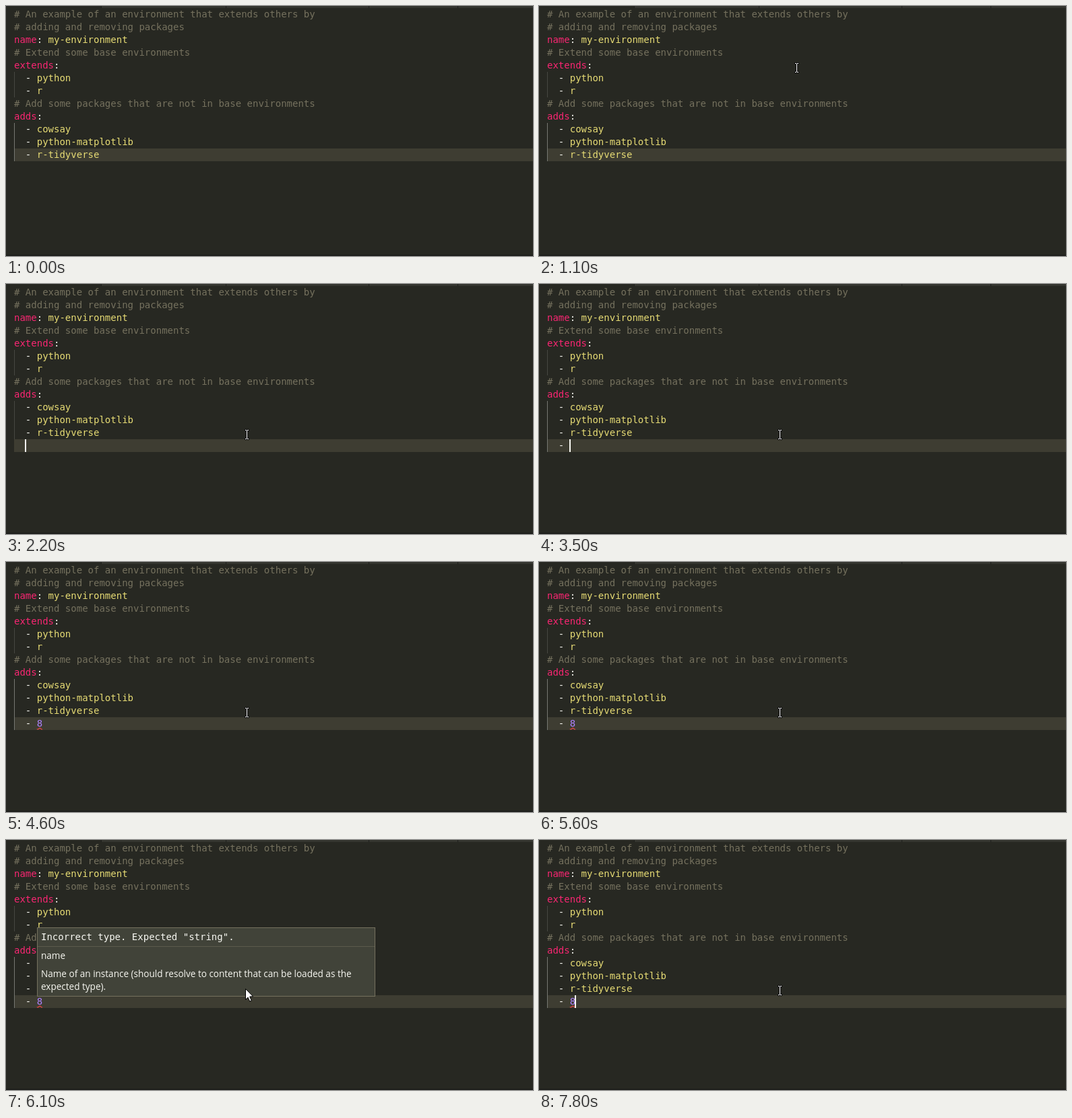
Animation of 782 by 372 pixels, one loop 8000 ms. Source, as an HTML page with a canvas:

```html
<!DOCTYPE html>
<html lang="en">
<head>
<meta charset="utf-8">
<title>Editing a YAML file</title>
<style>
  html, body { margin: 0; width: 100%; height: 100%; overflow: hidden; background: #272822; }
  canvas { display: block; }
</style>
</head>
<body>
<canvas id="stage" width="782" height="372"></canvas>
<script>
const W = 782, H = 372;
const LOOP = 8000, STEP = 100, BLINK = 500;
const LEFT = 12, TOP = 3, ROW = 19, CHAR = 8.428;
const MONO = '14px "DejaVu Sans Mono", monospace';
const SANS = '13.55px "Open Sans", sans-serif';
const C = {
  bg: '#272822', row: '#3e3d32', tab: '#34352f', edge: '#1e1f1c',
  text: '#f8f8f2', comment: '#75715e', key: '#f92672', string: '#e6db74',
  number: '#ae81ff', guide: '#464741', activeGuide: '#767771', error: '#ea4646',
  popup: '#414339', popupEdge: '#75715e', popupRule: '#5b5a4c'
};

const source = [
  '# An example of an environment that extends others by',
  '# adding and removing packages',
  'name: my-environment',
  '# Extend some base environments',
  'extends:',
  '  - python',
  '  - r',
  '# Add some packages that are not in base environments',
  'adds:',
  '  - cowsay',
  '  - python-matplotlib',
  '  - r-tidyverse'
];

// What the user does: time, text of the new line, start of the caret's blink.
const edits = [
  { time: 1700, blink: 1700 },
  { time: 2200, line: '  ', blink: 2200 },
  { time: 3300, line: '  -', blink: 3300 },
  { time: 3500, line: '  - ', blink: 3400 },
  { time: 4200, line: '  - 8', blink: 4100 },
  { time: 7800, line: '  - 8', blink: 7800 }
];
const MOVE = 1000, CLICK = 1700, CHECKED = 4600, POPUP = 6000, POPUP_END = 7800;

// An opaque canvas for the editor; the popup has its own transparent layer.
const stage = document.getElementById('stage').getContext('2d', { alpha: false });
const layer = document.createElement('canvas');
layer.width = W;
layer.height = H;
let ctx = stage;

const rowTop = i => TOP + ROW * i;
const clamp = v => Math.min(1, Math.max(0, v));
const lerp = (a, b, p) => a + (b - a) * p;

function rect(x, y, w, h, color) {
  ctx.fillStyle = color;
  ctx.fillRect(x, y, w, h);
}

function write(str, x, y, color, font = MONO) {
  ctx.font = font;
  ctx.fillStyle = color;
  ctx.fillText(str, x, y);
}

function tokens(line) {
  if (line[0] === '#') return [[line, C.comment]];
  if (line[0] === ' ') {
    const [, mark, item] = line.match(/^(\s*-?\s*)(.*)$/);
    return [[mark, C.text], [item, /^\d/.test(item) ? C.number : C.string]];
  }
  const [key, value] = line.split(':');
  return [[key, C.key], [':', C.text], [value, C.string]];
}

function drawLine(line, i) {
  let col = 0;
  for (const [str, color] of tokens(line)) {
    write(str, LEFT + col * CHAR, rowTop(i) + 14, color);
    col += str.length;
  }
}

function drawFrame() {
  rect(0, 0, W, H, C.bg);
  rect(142, 0, W - 142, 3, C.tab);
  for (const x of [141, 326, 538, 670]) rect(x, 0, 1, 3, C.edge);
  rect(0, H - 2, W, 2, C.edge);
}

function drawGuide(from, to, active) {
  rect(LEFT, rowTop(from), 1, ROW * (to - from), active ? C.activeGuide : C.guide);
}

function drawSquiggle(x, y, w) {
  ctx.beginPath();
  for (let dx = 0; dx <= w; dx += 0.5) {
    ctx.lineTo(x + dx, y - Math.sin((dx - 2.8) * Math.PI / 3));
  }
  ctx.strokeStyle = C.error;
  ctx.lineWidth = 1.2;
  ctx.stroke();
}

function paintPopup() {
  ctx = layer.getContext('2d');
  rect(46, 130, 502, 103, C.popupEdge);
  rect(47, 131, 500, 101, C.popup);
  rect(47, 158, 500, 1, C.popupRule);
  write('Incorrect type. Expected "string".', 52, 149, C.text);
  write('name', 52, 177, C.text, SANS);
  write('Name of an instance (should resolve to content that can be loaded as the', 52, 204, C.text, SANS);
  write('expected type).', 52, 223, C.text, SANS);
  ctx = stage;
}

function drawBeam(x, y) {
  for (const [grow, color] of [[1, '#111'], [0, '#fff']]) {
    const bar = (dx, dy, w, h) =>
      rect(x + dx - grow, y + dy - grow, w + 2 * grow, h + 2 * grow, color);
    bar(0, -6, 1, 12);
    for (const dy of [-7, 6]) for (const dx of [-2, 1]) bar(dx, dy, 2, 1);
  }
}

function drawArrow(x, y) {
  const shape = [[0, 0], [0, 16], [3.6, 12.7], [6.2, 18.6], [8.8, 17.5], [6.2, 11.6], [11, 11.3]];
  ctx.beginPath();
  for (const [dx, dy] of shape) ctx.lineTo(x + dx, y + dy);
  ctx.closePath();
  ctx.lineWidth = 1;
  ctx.strokeStyle = '#000';
  ctx.fillStyle = '#fff';
  ctx.fill();
  ctx.stroke();
}

// The pointer sweeps down to the text, rests, then settles on the last line.
function drawPointer(t) {
  const sweep = clamp((t - MOVE) / 300);
  const settle = clamp((t - MOVE - 400) / 200);
  drawBeam(Math.round(lerp(394, 357, sweep)), Math.round(lerp(35, 206, sweep) + 18 * settle));
}

function draw(time) {
  const t = Math.floor(time / STEP) * STEP;
  const edit = edits.filter(e => e.time <= t).pop();
  const lines = edit && edit.line ? [...source, edit.line] : source;
  const last = lines.length - 1;
  const blank = lines[last].trim() === '';
  const shown = t < POPUP_END ? clamp((t - POPUP + STEP) / (2 * STEP)) : 0;

  drawFrame();
  rect(LEFT, rowTop(last), W - LEFT, ROW, C.row);
  drawGuide(5, 7, false);
  drawGuide(9, blank ? last : last + 1, !blank);
  lines.forEach(drawLine);

  if (t >= CHECKED) drawSquiggle(46, rowTop(last) + 17, CHAR);
  if (t >= CLICK && !shown && (t - edit.blink) % (2 * BLINK) < BLINK) {
    rect(Math.round(LEFT + lines[last].length * CHAR - 1), rowTop(last), 2, ROW, C.text);
  }

  ctx.globalAlpha = shown;
  ctx.drawImage(layer, 0, 0);
  ctx.globalAlpha = 1;
  if (shown === 1) drawArrow(355.5, 221.5);
  else if (t >= MOVE) drawPointer(t);
}

paintPopup();
const start = performance.now();
function tick() {
  draw((performance.now() - start) % LOOP);
  requestAnimationFrame(tick);
}
tick();
</script>
</body>
</html>
```
